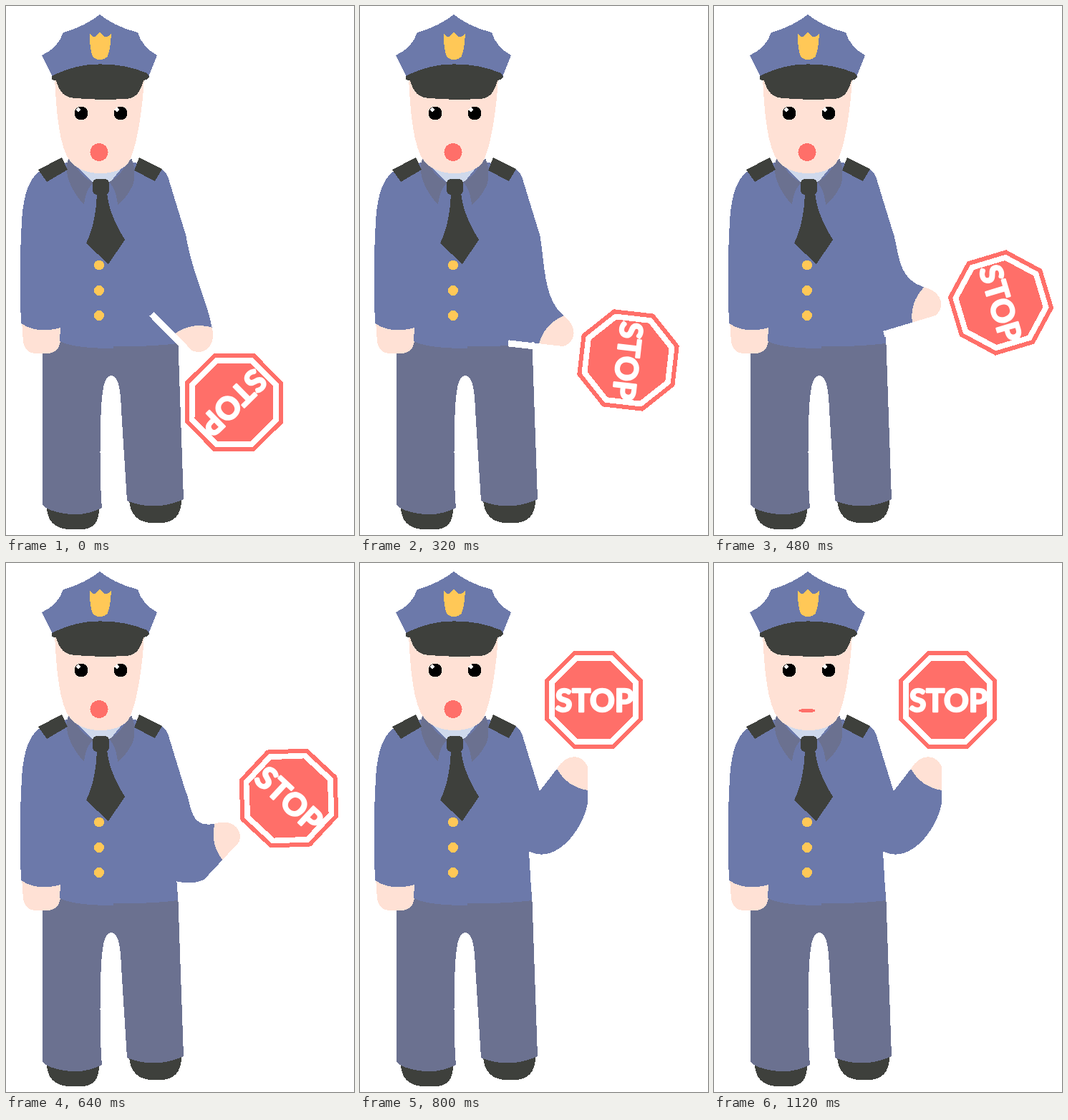
An HTML page for the animation above (1.36 s loop, 486 by 740 pixels).

```html
<!DOCTYPE html>
<html lang="en">
<head>
<meta charset="utf-8">
<title>Officer with stop sign</title>
<style>
  html, body { margin: 0; width: 100%; height: 100%; overflow: hidden; background: #fff; }
  svg { display: block; shape-rendering: crispEdges; }
  .blue { fill: #6c79aa; }
  .slate { fill: #6b7190; }
  .dark { fill: #3e403c; }
  .skin { fill: #ffe1d5; }
  .red { fill: #ff6f69; }
  .gold { fill: #ffc857; }
  .white { fill: #fff; }
  text { font: 700 43px Lato, "Open Sans", sans-serif; text-anchor: middle;
         stroke: #fff; stroke-width: 2.5; stroke-linejoin: round; }
</style>
</head>
<body>
<svg width="486" height="740" viewBox="0 0 486 740">
  <!-- legs -->
  <g class="dark">
    <path d="M57 700C57 720 68 732 90 732H105C122 732 131 722 130 700Z"/>
    <path d="M172 690C173 712 185 723 205 723H215C235 723 245 712 245 690Z"/>
  </g>
  <path class="slate" d="M51 460V698Q56 704 70 707.500Q105 717 134 702L133 690C131 650 131 600 133 560C135 535 137 517 147 517C158 517 160 540 161 565L169 692Q208 708 248 690L240 460Z"/>

  <!-- torso -->
  <path class="skin" d="M22 440L24 470Q27 487 45 486H58Q74 485 76 468V440Z"/>
  <path class="blue" d="M84 219L46 232C31 243 24 268 22 300C19 350 19 400 21 444Q44 459 76 450L75 469Q95 479 150 479V476Q200 477 240 472L236 404L251 320L228 245Q225 231 215 227L180 219Z"/>
  <path fill="#cfd9ec" d="M98 224L121 247H145L164 224Z"/>
  <path class="slate" d="M88 213Q82 222 87 242Q94 262 109 278Q111 257 122 247Q108 240 100 228Z"/>
  <path class="slate" d="M175 213Q182 228 178 248Q171 266 156 278Q154 257 144 246Q156 240 164 228Z"/>
  <path class="dark" d="M45 229L78 212L86 229L57 246ZM186 212L218 228L208 245L179 230Z"/>
  <rect class="dark" x="121" y="242" width="23" height="22" rx="6"/>
  <path class="dark" d="M127 260C126 292 121 312 112 332L143 361L166 327Q143 290 141 260Z"/>
  <g class="gold">
    <circle cx="130" cy="362.5" r="7"/><circle cx="130" cy="398" r="7"/><circle cx="130" cy="433" r="7"/>
  </g>

  <!-- head -->
  <path class="skin" d="M68 100C70 145 74 200 91 219Q106 234 132 234Q157 234 170 221C182 203 191 145 193 100Z"/>
  <path class="blue" d="M131 12C118 22 102 31 80 37C75 51 66 62 50 69L65 99H199L211 69C198 62 188 51 184 37C160 31 144 22 131 12Z"/>
  <path class="dark" d="M64 98Q98 81 131 81.500Q166 81 197 94Q202 99 198 102L192 104C187 122 181 130 165 130Q131 132 97 129C81 128 75 121 70 104Q62 104 64 98Z"/>
  <path class="gold" d="M117 38Q122 46 127 41L131 36L136 42Q142 45 147 38Q146 60 142 70Q138 75 131 75Q123 75 120 68Q116 52 117 38Z"/>
  <circle cx="105" cy="150" r="9.500"/><circle cx="160" cy="150" r="9.500"/>
  <circle class="white" cx="101" cy="145" r="2.800"/><circle class="white" cx="155" cy="145" r="2.800"/>
  <ellipse class="red" id="mouth" cx="130"/>

  <!-- arm; hand, stick and sign turn as one piece around the sign's centre -->
  <path class="blue" id="arm"/>
  <g id="held">
    <path class="skin" d="M-51.500 96.500C-34.500 66.500 3.500 76.500 -7.500 126.500Q-36.500 122.500 -51.500 96.500Z"/>
    <rect class="white" x="-9" y="60" width="9" height="109"/>
    <path class="red" id="edge"/>
    <path class="white" id="band"/>
    <path class="red" id="face"/>
    <text class="white" x="1" y="16">STOP</text>
  </g>
</svg>
<script>
const STEP = 80, LOOP = 1360, LIFT_STEPS = 10, LAST_STEP = 14;
const el = id => document.getElementById(id);
const clamp = (v, lo, hi) => Math.min(hi, Math.max(lo, v));
const add = (p, q, k = 1) => [p[0] + q[0] * k, p[1] + q[1] * k];

// evenly timed points on the path of the sign's centre
const signPath = [[318.5, 554.5], [355.5, 524.5], [374.5, 495.5], [400.5, 415], [395, 329], [326.5, 191.5]];

function spline(points, progress) {
  const last = points.length - 1;
  const i = Math.min(last - 1, Math.floor(progress * last));
  const f = progress * last - i;
  const [a, b, c, d] = [-1, 0, 1, 2].map(k => points[clamp(i + k, 0, last)]);
  return b.map((v, n) => v + f / 2 * (c[n] - a[n]
    + f * (2 * a[n] - 5 * v + 4 * c[n] - d[n] + f * (3 * (v - c[n]) + d[n] - a[n]))));
}

function rotate([x, y], degrees) {
  const a = degrees * Math.PI / 180;
  return [x * Math.cos(a) - y * Math.sin(a), x * Math.sin(a) + y * Math.cos(a)];
}

function octagon(apothem) {
  const r = apothem / Math.cos(Math.PI / 8);
  const corners = Array.from({ length: 8 }, (_, i) => rotate([r, 0], 22.5 + 45 * i));
  return `M${corners.join("L")}Z`;
}

// The sleeve joins the fixed elbow side to the cuff of the turning hand.
function sleeve(centre, turn) {
  const place = p => add(centre, rotate(p, turn));
  const elbow = [251, 319];
  const cuffTop = place([-51.5, 96.5]), cuffEnd = place([-7.5, 126.5]);
  const drop = Math.max(0, cuffTop[1] - elbow[1]);
  const upper1 = add(elbow, [8, 0.4 * drop], drop ? 1 : 0);
  const upper2 = add(cuffTop, rotate([-0.566, 0.83], turn), Math.min(38, 0.8 * drop));
  const waist = [238, 404 + 0.42 * (cuffEnd[1] - 318)];
  const reach = Math.max(0, cuffEnd[0] - waist[0]);
  const lower1 = add(cuffEnd, rotate([0.1, 1], turn), reach / 2);
  const lower2 = add(waist, [reach / 2, 0.23 * (waist[1] - cuffEnd[1])]);
  return `M228 250L${elbow}C${upper1} ${upper2} ${cuffTop}L${cuffEnd}C${lower1} ${lower2} ${waist}L236 404L228 380Z`;
}

function draw(time) {
  const step = Math.min(LAST_STEP, Math.floor(time % LOOP / STEP));
  const lift = Math.min(1, step / LIFT_STEPS);
  const shut = clamp((step - LIFT_STEPS) / (LAST_STEP - LIFT_STEPS), 0, 1);
  const centre = spline(signPath, lift);
  const turn = 135.5 * (1 - 0.7 * lift - 0.3 * lift ** 4);

  el("held").setAttribute("transform", `translate(${centre}) rotate(${turn})`);
  el("arm").setAttribute("d", sleeve(centre, turn));
  el("mouth").setAttribute("cy", 204.5 + 2 * shut);
  el("mouth").setAttribute("rx", 12.5 - shut);
  el("mouth").setAttribute("ry", 12.5 - 9.8 * shut);
}

el("edge").setAttribute("d", octagon(68.5));
el("band").setAttribute("d", octagon(62.5));
el("face").setAttribute("d", octagon(54.8));

const start = performance.now();
function tick() {
  draw(performance.now() - start);
  requestAnimationFrame(tick);
}
tick();
</script>
</body>
</html>
```
